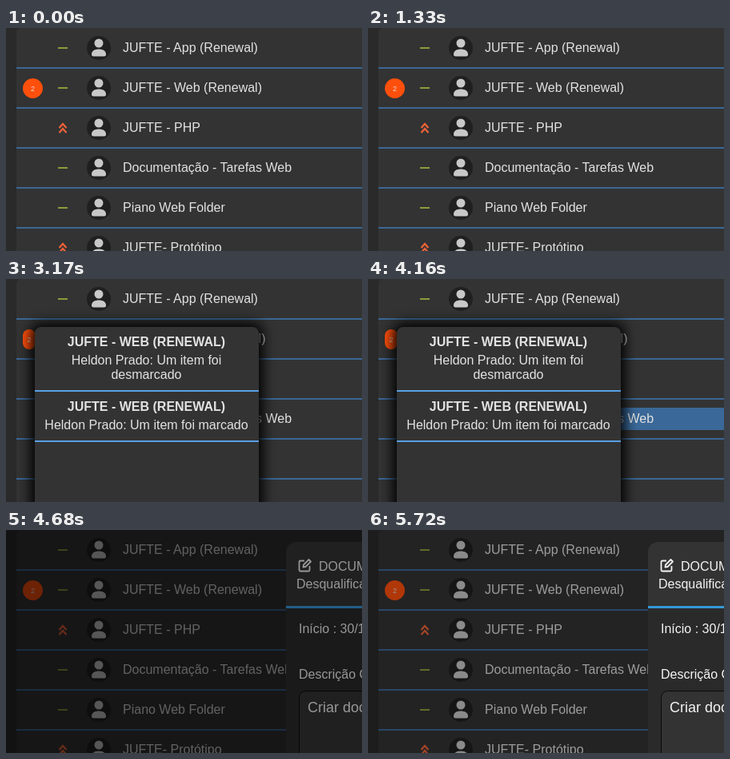
Recreate the animation shown at these times as an HTML page. Size 445 px wide and 279 px high, loop 5.85 s.

```html
<!DOCTYPE html>
<html lang="pt">
<head>
<meta charset="utf-8">
<style>
  html, body { margin: 0; width: 100%; height: 100%; overflow: hidden; background: #2a2a2a; }
  svg { display: block; width: 445px; height: 279px; }
  text { font: 16px "Liberation Sans", Arial, sans-serif; fill: #e2e2e2; }
  #popup text { text-anchor: middle; }
  #popup .title { font-weight: bold; }
  #popup .shadow { filter: blur(8px); }
  #modal text { fill: #f4f4f4; }
</style>
</head>
<body>
<svg viewBox="0 0 445 279">
  <defs>
    <g id="avatar">
      <circle r="15" fill="#202020"/>
      <circle cy="-6" r="5.500" fill="#c8c8c8"/>
      <path d="M-9 8C-9 3.500-5 1.500 0 1.500S9 3.500 9 8Q9 10.500 6.500 10.500H-6.500Q-9 10.500-9 8Z" fill="#c8c8c8"/>
    </g>
    <path id="normal" d="M-6 0H6" stroke="#8d9b3c" stroke-width="2"/>
    <path id="urgent" d="M-4.500 0L0-5L4.500 0M-4.500 6L0 1L4.500 6" fill="none" stroke="#ee6338" stroke-width="2.200"/>
  </defs>

  <rect x="13" width="450" height="300" rx="6" fill="#333"/>
  <rect id="hover" x="141" y="161" width="320" height="28" rx="3" fill="#3a6898"/>
  <g id="rows"></g>
  <rect id="badge" x="21" y="63" width="25" height="25" rx="12.500" fill="#ff4f0c"/>
  <text id="count" y="79" text-anchor="middle" style="font-size:9px;fill:#e8d8d0">2</text>

  <g id="popup">
    <rect class="shadow" x="31" y="55" width="290" height="270" rx="12"/>
    <rect x="36" y="60" width="280" height="260" rx="8" fill="#333"/>
    <path d="M36 140H316M36 203H316" stroke="#58a0e6" stroke-width="2"/>
    <text class="title" x="175.500" y="84">JUFTE - WEB (RENEWAL)</text>
    <text x="175.500" y="107">Heldon Prado: Um item foi</text>
    <text x="175.500" y="125">desmarcado</text>
    <text class="title" x="175.500" y="165">JUFTE - WEB (RENEWAL)</text>
    <text x="175.500" y="188">Heldon Prado: Um item foi marcado</text>
  </g>

  <g id="modal">
    <rect width="445" height="279" opacity=".31"/>
    <rect x="350" y="15" width="130" height="300" rx="14" fill="#2a2a2a"/>
    <path d="M350 96V29Q350 15 364 15H445V96Z" fill="#333"/>
    <path d="M350 96.500H445" stroke="#3598d8" stroke-width="3"/>
    <path d="M373 38.500H368Q366.500 38.500 366.500 40V50Q366.500 51.500 368 51.500H378Q379.500 51.500 379.500 50V45
             M371.500 46.500L372 43.500L378.500 37L381 39.500L374.500 46Z"
      fill="none" stroke="#f4f4f4" stroke-width="1.800" stroke-linejoin="round"/>
    <text x="391" y="51">DOCUMENTAÇÃO</text>
    <text x="363" y="73">Desqualificado</text>
    <text x="366" y="129">Início : 30/10</text>
    <text x="366" y="186">Descrição Completa</text>
    <rect x="366.500" y="201.500" width="110" height="110" rx="8" fill="#333" stroke="#0a0a0a"/>
    <text x="377" y="228" style="font-size:18px">Criar documento</text>
  </g>
  <rect id="shade" width="445" height="279" opacity=".38"/>
</svg>
<script>
  const $ = id => document.getElementById(id);
  const tasks = [
    ["JUFTE - App (Renewal)", "normal"],
    ["JUFTE - Web (Renewal)", "normal"],
    ["JUFTE - PHP", "urgent"],
    ["Documentação - Tarefas Web", "normal"],
    ["Piano Web Folder", "normal"],
    ["JUFTE- Protótipo", "urgent"]
  ];
  $("rows").innerHTML = tasks.map(([name, level], i) => `
    <g transform="translate(0 ${i * 50})">
      <use href="#${level}" x="71" y="25"/>
      <use href="#avatar" x="116" y="25"/>
      <text id="name${i}" x="146" y="30">${name}</text>
      <path d="M13 50H445" stroke="#3a6796" stroke-width="2"/>
    </g>`).join("");

  // Visible interval of each layer, in ms
  const shown = {
    popup: [1690, 4550],
    hover: [4160, 4680],
    modal: [4680, 5850],
    shade: [4680, 5720]
  };
  const start = performance.now();

  function draw(now) {
    const t = Math.max(0, now - start) % 5850;
    const isOn = id => t >= shown[id][0] && t < shown[id][1];
    for (const id in shown) $(id).style.display = isOn(id) ? "" : "none";

    // The open popup squeezes the badge and pushes the row's name aside
    const open = isOn("popup"), width = open ? 16 : 25;
    $("badge").setAttribute("width", width);
    $("badge").setAttribute("rx", width / 2);
    $("count").setAttribute("x", 21 + width / 2);
    $("name1").setAttribute("x", open ? 150.5 : 146);
    requestAnimationFrame(draw);
  }
  draw(start);
</script>
</body>
</html>
```
